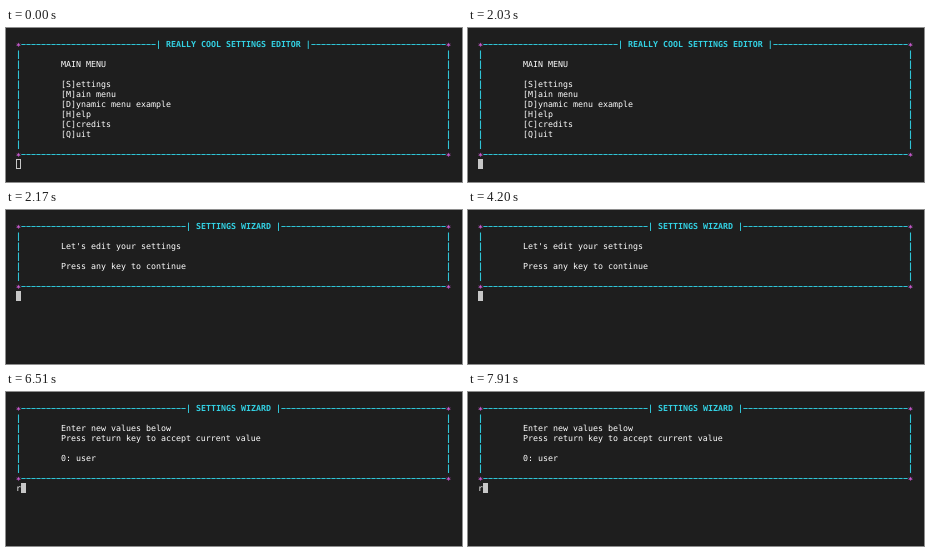
An HTML page that plays this animation: 456x154 px, repeating every 8 s.

```html
<!DOCTYPE html>
<html lang="en">
<head>
<meta charset="utf-8">
<title>Settings editor</title>
<style>
  html, body { margin: 0; width: 100%; height: 100%; overflow: hidden; background: #1e1e1e; }
  svg { display: block; width: 456px; height: 154px; }
  text {
    font: 8.305px "DejaVu Sans Mono", "Liberation Mono", monospace;
    fill: #fff; white-space: pre; text-rendering: geometricPrecision;
  }
  .title { font-weight: bold; fill: #33d1e3; }
  .star { font-weight: bold; fill: #d65fdc; }
  .rule { stroke: #2fc4d6; stroke-width: 1.1; }
</style>
</head>
<body>
<svg id="stage" viewBox="0 0 456 154"></svg>
<script>
const LOOP = 8000, CELL = 5, ROW = 10, LEFT = 10, TOP = 11, LAST = 86;
const stage = document.getElementById('stage');
const colX = col => LEFT + col * CELL;
const rowY = row => TOP + row * ROW;

function add(parent, tag, attrs, content = '') {
  const node = document.createElementNS('http://www.w3.org/2000/svg', tag);
  for (const key in attrs) node.setAttribute(key, attrs[key]);
  node.textContent = content;
  parent.append(node);
  return node;
}

function write(parent, col, row, content, cls = '', shift = 0) {
  return add(parent, 'text', { x: colX(col), y: rowY(row) + 8 + shift, class: cls }, content);
}

function rule(parent, x1, y1, x2, y2, dash) {
  add(parent, 'line', { x1, y1, x2, y2, class: 'rule', 'stroke-dasharray': dash });
}

// Text lines sit inside the box, keyed by row; the prompt is the row below it.
function panel(title, bottom, lines) {
  const g = add(stage, 'g', {});
  const label = `| ${title} |`;
  const start = (LAST + 1 - label.length) / 2;
  const across = (from, to, row) =>
    rule(g, colX(from) + 0.4, rowY(row) + 5.5, colX(to) - 0.4, rowY(row) + 5.5, '4.2 0.8');

  across(1, start, 0);
  across(start + label.length, LAST, 0);
  across(1, LAST, bottom);
  write(g, start, 0, label, 'title');
  for (const col of [0, LAST]) {
    const x = colX(col) + 2.5;
    rule(g, x, rowY(1) + 1.6, x, rowY(bottom), '8.4 1.6');
    for (const row of [0, bottom]) write(g, col, row, '*', 'star', 1.8);
  }
  for (const row in lines) write(g, 9, +row, lines[row]);
  return { g, prompt: bottom + 1 };
}

const panels = [
  panel('REALLY COOL SETTINGS EDITOR', 11, {
    2: 'MAIN MENU',
    4: '[S]ettings',
    5: '[M]ain menu',
    6: '[D]ynamic menu example',
    7: '[H]elp',
    8: '[C]credits',
    9: '[Q]uit'
  }),
  panel('SETTINGS WIZARD', 6, {
    2: "Let's edit your settings",
    4: 'Press any key to continue'
  }),
  panel('SETTINGS WIZARD', 7, {
    2: 'Enter new values below',
    3: 'Press return key to accept current value',
    5: '0: user'
  })
];

const input = write(stage, 0, 8, '');
const cursor = add(stage, 'rect', { width: 4, height: 9, stroke: '#c7c7c7' });

const screens = [[0, 0], [2100, 1], [4270, 2]];
const typed = [[0, ''], [6510, 'r'], [6580, 'ro'], [6720, 'roo'], [6790, 'root'],
               [7420, 'roo'], [7630, 'ro'], [7910, 'r']];
const FOCUS = 840;

const valueAt = (steps, t) => steps.filter(([from]) => t >= from).pop()[1];

function draw(t) {
  const current = valueAt(screens, t), entry = valueAt(typed, t);
  panels.forEach((p, i) => p.g.setAttribute('display', i === current ? 'inline' : 'none'));
  input.textContent = entry;
  cursor.setAttribute('x', colX(entry.length) + 0.5);
  cursor.setAttribute('y', rowY(panels[current].prompt) + 0.5);
  cursor.setAttribute('fill', t < FOCUS ? 'none' : '#c7c7c7');
}

const origin = performance.now();
function tick() {
  draw((performance.now() - origin) % LOOP);
  requestAnimationFrame(tick);
}
tick();
</script>
</body>
</html>
```
